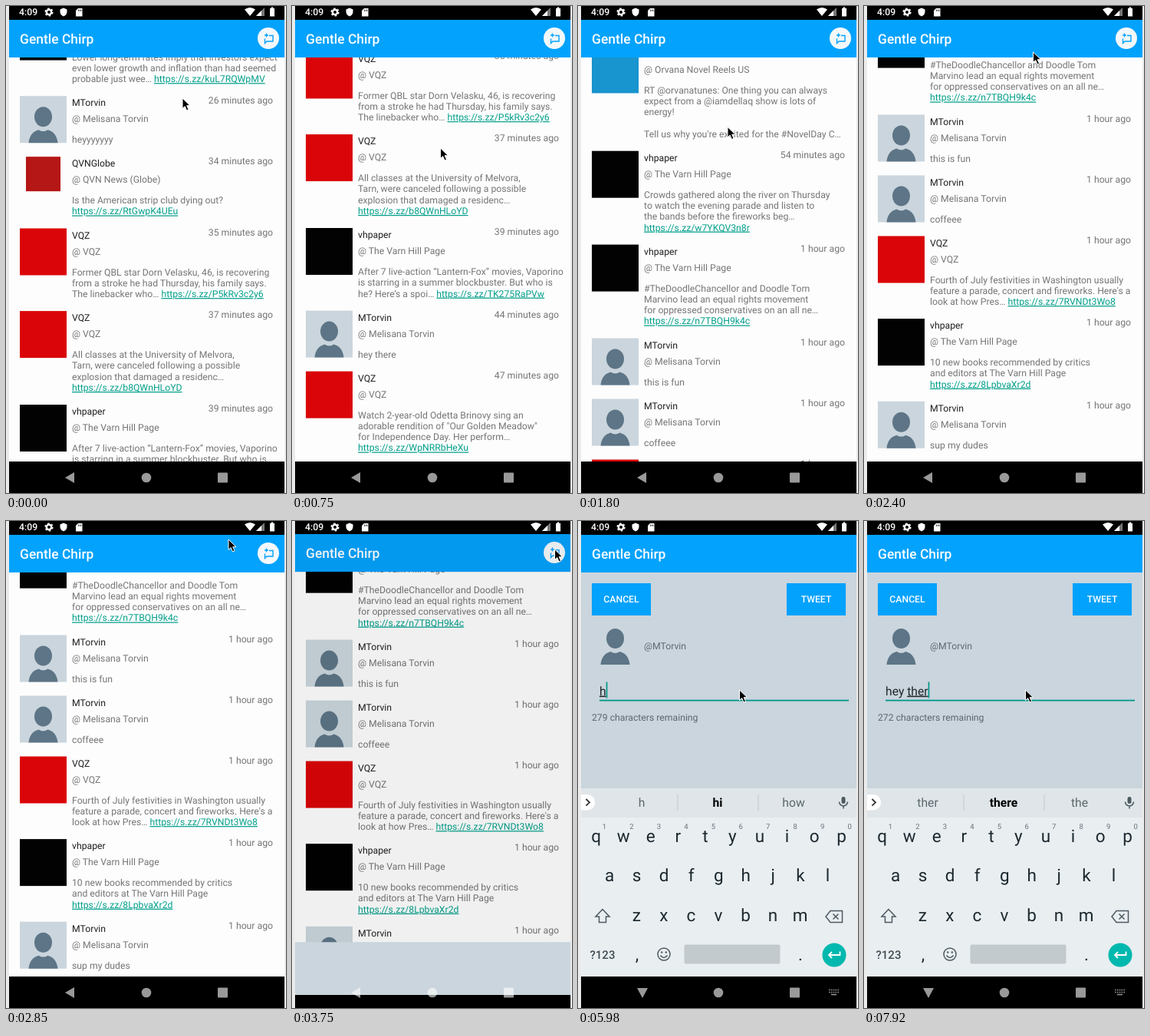
An HTML page that plays this animation: 365 by 634 pixels, repeating every 8000 ms.

```html
<!DOCTYPE html>
<html lang="en">
<head>
<meta charset="utf-8">
<title>Gentle Chirp</title>
<style>
  html, body { margin: 0; width: 100%; height: 100%; overflow: hidden; background: #ebebeb; }
  svg { display: block; width: 365px; height: 634px; }
  text { font-family: Roboto, "Open Sans", sans-serif; white-space: pre; text-rendering: geometricPrecision; }
  .link { fill: #009f8a; text-decoration: underline; }
  .line { fill: none; stroke: #4d5a61; stroke-width: 1.5; }
</style>
</head>
<body>
<svg id="stage" viewBox="0 0 365 634"></svg>
<script>
const LOOP = 8000, LINE = 14.3, BODY = 12.22, FIELD = 15.71;
const BLUE = '#03a2fc', SHEET = '#cad5dd', GREY = '#757575';

const rect = (x, y, w, h, fill, more = '') =>
  `<rect x="${x}" y="${y}" width="${w}" height="${h}" fill="${fill}" ${more}/>`;
const path = (d, more = '') => `<path d="${d}" ${more}/>`;
const circle = (x, y, r, fill, more = '') => `<circle cx="${x}" cy="${y}" r="${r}" fill="${fill}" ${more}/>`;
const text = (x, y, str, size = BODY, fill = GREY, more = '') =>
  `<text x="${x}" y="${y}" font-size="${size}" fill="${fill}" ${more}>${str}</text>`;
const MID = 'text-anchor="middle"', END = 'text-anchor="end"', MEDIUM = 'font-weight="500"';

const person = '<ellipse cx="30.5" cy="27" rx="11.5" ry="13" fill="#5d7586"/>' +
  path('M11.5 61c1-10 6-15 13-17c4 2.5 8 2.5 12 0c7 2 12 7 13 17z', 'fill="#5d7586"');
const block = color => rect(0, 0, 61, 61, color);

const accounts = {
  friend: ['MTorvin', 'Melisana Torvin', rect(0, 0, 61, 61, SHEET) + person],
  globe: ['QVNGlobe', 'QVN News (Globe)', rect(8, 0, 45, 45, '#b51616')],
  red: ['VQZ', 'VQZ', block('#da0508')],
  paper: ['vhpaper', 'The Varn Hill Page', block('#020202')],
  reels: ['NovelReels', 'Orvana Novel Reels US', block('#1894ce')]
};

// account, age, lines; a trailing web address becomes a link
const posts = [
  ['paper', '25 minutes', 'Lower long-term rates imply that investors expect|even lower growth and inflation than had seemed|probable just wee… https://s.zz/kuL7RQWpMV'],
  ['friend', '26 minutes', 'heyyyyyyy'],
  ['globe', '34 minutes', 'Is the American strip club dying out?|https://s.zz/RtGwpK4UEu'],
  ['red', '35 minutes', 'Former QBL star Dorn Velasku, 46, is recovering|from a stroke he had Thursday, his family says.|The linebacker who… https://s.zz/P5kRv3c2y6'],
  ['red', '37 minutes', 'All classes at the University of Melvora,|Tarn, were canceled following a possible|explosion that damaged a residenc…|https://s.zz/b8QWnHLoYD'],
  ['paper', '39 minutes', 'After 7 live-action “Lantern-Fox” movies, Vaporino|is starring in a summer blockbuster. But who is|he? Here’s a spoi… https://s.zz/TK275RaPVw'],
  ['friend', '44 minutes', 'hey there'],
  ['red', '47 minutes', 'Watch 2-year-old Odetta Brinovy sing an|adorable rendition of "Our Golden Meadow"|for Independence Day. Her perform…|https://s.zz/WpNRRbHeXu'],
  ['reels', '48 minutes', "RT @orvanatunes: One thing you can always|expect from a @iamdellaq show is lots of|energy!||Tell us why you're excited for the #NovelDay C…"],
  ['paper', '54 minutes', 'Crowds gathered along the river on Thursday|to watch the evening parade and listen to|the bands before the fireworks beg…|https://s.zz/w7YKQV3n8r'],
  ['paper', '1 hour', '#TheDoodleChancellor and Doodle Tom|Marvino lead an equal rights movement|for oppressed conservatives on an all ne…|https://s.zz/n7TBQH9k4c'],
  ['friend', '1 hour', 'this is fun'],
  ['friend', '1 hour', 'coffeee'],
  ['red', '1 hour', "Fourth of July festivities in Washington usually|feature a parade, concert and fireworks. Here's a|look at how Pres… https://s.zz/7RVNDt3Wo8"],
  ['paper', '1 hour', '10 new books recommended by critics|and editors at The Varn Hill Page|https://s.zz/8LpbvaXr2d'],
  ['friend', '1 hour', 'sup my dudes']
];

function drawPosts() {
  let y = 10;
  return posts.map(([key, age, body]) => {
    const [user, name, avatar] = accounts[key], lines = body.split('|');
    const out = `<g transform="translate(0 ${y})"><g transform="translate(18 0)">${avatar}</g>` +
      text(86, 13.3, user, BODY, '#1f1f1f') + text(86, 34, '@ ' + name) + text(348, 9.3, age + ' ago', BODY, GREY, END) +
      lines.map((s, i) => text(86, 61 + i * LINE, s.replace(/https:\S+/, '<tspan class="link">$&</tspan>'))).join('') + '</g>';
    y += 79 + (lines.length - 1) * LINE;
    return out;
  }).join('');
}

const header = rect(4, 18, 359, 49, BLUE) + text(18, 49, 'Gentle Chirp', 17.46, '#fff', MEDIUM);

const composeButton = circle(342, 42, 14, '#f4f8fb') +
  path('M343 38.5h5v7.5h-8l-2.5 2.5v-6M339.500 35.500v5M337 38h5', `fill="none" stroke="${BLUE}" stroke-width="1.4"`);

const statusIcons = text(17, 12.4, '4:09', BODY, '#fff', MEDIUM) +
  circle(56, 8, 3.2, 'none', 'stroke="#fff" stroke-width="2.4"') +
  circle(56, 8, 4.8, 'none', 'stroke="#fff" stroke-width="1.6" stroke-dasharray="2.5 2.53"') +
  path('M75 2.500l4.500 2v3.500q-.5 4-4.500 5.500q-4-1.500-4.500-5.500v-3.500z', 'fill="#fff"') +
  path('M94 3h5.500v10.500h-8.500v-7.500z', 'fill="#fff"') + path('M94.500 4.500v2.500M96.300 4.500v2.500M98 4.500v2.500', 'stroke="#000" stroke-width=".7"') +
  path('M311 4.500q7-5 14 0l-7 8.500z', 'fill="#fff"') +
  path('M337 2v11h-11z', 'fill="#777"') + path('M333 6v7h-7z', 'fill="#fff"') +
  path('M344 3h1.700v-1.500h2.600v1.500h1.700v10.500h-6z', 'fill="#fff"');

const navIcons = '<g fill="#fff" opacity=".6">' + path('M77 614l12-7v14z', 'id="back"') +
  circle(183, 614, 6.3) .replace('fill="undefined"', '') + '<rect x="276" y="607.500" width="13" height="13" rx="1"/>' +
  '<g id="imeIcon">' + path('M327 610.500h13M327 613.500h13', 'stroke="#fff" stroke-width="1.600" stroke-dasharray="1.600 1.250" fill="none"') +
  path('M330 616.500h7', 'stroke="#fff" stroke-width="1.500"') + '</g></g>';

const button = (x, label) => rect(x, 81, 77, 42, BLUE) + text(x + 38.5, 106.4, label, BODY, '#fff', MID + MEDIUM);

const composer = rect(4, 0, 359, 593, SHEET) + rect(4, 0, 359, 18, '#000') + header +
  button(18, 'CANCEL') + button(272, 'TWEET') +
  `<g transform="translate(18 126)">${person}</g>` +
  text(86, 167.4, '@MTorvin', BODY, '#5f696f') +
  text(28, 226.6, 'Enter tweet here...', FIELD, '#7d878e', 'id="hint"') +
  text(28, 226.6, '', FIELD, '#20272b', 'id="typed"') +
  rect(28, 232.7, 325, 1, '#6d7880', 'id="fieldLine"') +
  rect(28, 209.5, 1.7, 21, '#009688', 'id="caret"') +
  text(18, 260.4, '', BODY, '#5d666c', 'id="count"');

function drawKeyboard() {
  const ink = '#1c292f';
  const row = (keys, x0, y) => [...keys].map((k, i) => text(x0 + 35.55 * i, y, k, 22.5, ink, MID)).join('');
  const digits = [...'1234567890'].map((d, i) => text(34.3 + 35.55 * i, 400.5, d, 9.5, '#66737a', MID)).join('');
  const words = [83, 182, 281].map((x, i) =>
    text(x, 372, '', FIELD, i === 1 ? '#000' : '#5c686e', `class="word" ${MID} ${i === 1 ? 'font-weight="700"' : ''}`)).join('');
  return rect(4, 347, 359, 246, '#e9eef1') + rect(4, 347, 359, 39, '#dfe5e8') + rect(4, 346.5, 359, 1, '#c3ccd2') +
    path('M4 356h8a10 10 0 0 1 0 20.500h-8z', 'fill="#fff"') +
    path('M10.500 362l4.500 4.300l-4.500 4.300', 'class="line" style="stroke:#333;stroke-width:1.800"') +
    rect(129.5, 356, 1, 21, '#c2cacf') + rect(234.5, 356, 1, 21, '#c2cacf') + words +
    rect(343.5, 359, 5, 9, '#4d5a61', 'rx="2.5"') + path('M340.500 365.500a5.500 5.500 0 0 0 11 0M346 371v3.500', 'class="line"') +
    row('qwertyuiop', 23.7, 418) + digits + row('asdfghjkl', 41, 469) + row('zxcvbnm', 76.3, 521) +
    path('M32 505.500l-9 9.500h4.500v7.500h9v-7.500h4.500z', 'class="line"') +
    path('M329 507.500h15.500v15h-15.500l-6-7.500zM332.500 511.500l7 7M339.500 511.500l-7 7', 'class="line"') +
    text(32, 569.5, '?123', 15, '#3f4c53', MID + MEDIUM) + text(77, 572, ',', 22.5, ink, MID) + text(290, 572, '.', 22.5, ink, MID) +
    circle(112, 564, 8, 'none', 'class="line"') + path('M107.500 565.500q4.500 6 9 0', 'class="line"') +
    circle(109.2, 561.5, 1.2, '#4d5a61') + circle(114.8, 561.5, 1.2, '#4d5a61') +
    rect(138.5, 551.5, 125, 25, '#c3cacd', 'rx="2"') +
    circle(334, 565, 15.5, '#00b8ae') + path('M341.500 560.500v4.500h-14M331 561l-4 4l4 4', 'class="line" style="stroke:#fff;stroke-width:1.800"');
}

const pointer = path('M0 0v13.500l3.200-2.900l2.300 5.400l2.500-1.100l-2.300-5.200h4.300z', 'fill="#000" stroke="#fff" stroke-width="1"');

document.getElementById('stage').innerHTML = `
  <defs>
    <clipPath id="listClip">${rect(4, 67, 359, 526)}</clipPath>
    <clipPath id="sheetClip"><rect id="reveal" x="4" width="359"/></clipPath>
    <clipPath id="keysClip">${rect(4, 67, 359, 526)}</clipPath>
  </defs>
  ${rect(4, 0, 359, 634, '#000')}
  <g id="feed">${rect(4, 67, 359, 526, '#fdfdfd')}
    <g clip-path="url(#listClip)"><g id="list">${drawPosts()}</g></g>${header}${composeButton}</g>
  <g id="sheet" clip-path="url(#sheetClip)">${composer}</g>
  <g clip-path="url(#keysClip)"><g id="keyboard">${drawKeyboard()}</g></g>
  ${navIcons}${statusIcons}<g id="pointer">${pointer}</g>`;

// tables of [time, value, ...]
const scrollSteps = [[0, 0], [150, 68], [300, 120], [450, 170], [600, 206], [750, 230], [900, 245], [1050, 253], [1200, 260],
  [1350, 402.4], [1500, 556], [1650, 680], [1800, 775], [1950, 838], [2100, 870], [2250, 930], [2400, 1066], [2550, 1066], [3150, 1052]];
const pointerSteps = [[0, 230, 120], [150, 232, 50], [300, 235, 2], [600, 215, 60], [900, 172, 310], [1050, 172, 390], [1200, 175, 385],
  [1350, 176.5, 242.5], [1500, 180, 90], [1650, 185, 75], [1950, 205, 240], [2100, 212, 256], [2250, 217, 196], [2400, 220.5, 60],
  [2550, 226, 22], [2850, 290, 24], [3150, 350, 34], [3300, 342.5, 37], [3750, 342.5, 37], [4350, 214, 196], [4500, 208, 212], [4650, 210.5, 220]];
const sheetSteps = [[3600, 0], [3750, .077], [3900, .784], [4050, .99], [4200, 1]];
const keyboardSteps = [[4800, 250], [4950, 150], [5100, 25], [5240, 0]];
const typing = [[0, '', 'I', 'The', "I'm"], [5980, 'h', 'h', 'hi', 'how'], [6120, 'he', 'he', 'hey', 'the'],
  [6270, 'hey ', 'I', 'there', 'you'], [6570, 'hey t', 't', 'the', 'to'], [7620, 'hey th', 'th', 'the', 'that'],
  [7770, 'hey the', 'the', 'there', 'they'], [7920, 'hey ther', 'ther', 'there', 'the']];
const caretShown = [[4800, 5530], [5980, 7020], [7620, LOOP]];

function at(steps, t) {
  const i = steps.findIndex(s => s[0] > t);
  if (i === 0) return steps[0].slice(1);
  if (i < 0) return steps[steps.length - 1].slice(1);
  const a = steps[i - 1], b = steps[i], k = (t - a[0]) / (b[0] - a[0]);
  return a.slice(1).map((v, n) => v + (b[n + 1] - v) * k);
}

const $ = id => document.getElementById(id);
const set = (id, attrs) => { for (const k in attrs) $(id).setAttribute(k, attrs[k]); };
const move = (id, x, y) => set(id, { transform: `translate(${x} ${y})` });
const show = (id, on) => set(id, { visibility: on ? 'visible' : 'hidden' });
const words = document.querySelectorAll('.word');
let lastTyped = null;

function type([, value, ...guesses]) {
  if (value === lastTyped) return;
  lastTyped = value;
  $('typed').innerHTML = value.replace(/\S+$/, '<tspan text-decoration="underline">$&</tspan>');
  $('count').textContent = `${280 - value.length} characters remaining`;
  words.forEach((w, i) => w.textContent = guesses[i]);
  show('hint', !value);
  set('caret', { x: 28 + (value ? $('typed').getComputedTextLength() : 0) });
}

function render(t) {
  const tick = t < 5240 ? Math.floor(t / 150) * 150 : t;
  const [open] = at(sheetSteps, tick);
  move('list', 0, -.4 - at(scrollSteps, tick)[0]);
  move('feed', 0, -12 * open);
  set('feed', { opacity: tick < 3750 ? 1 : tick < 3900 ? .95 : .9 });
  move('sheet', 0, 26 * (1 - open));
  set('reveal', { y: 568 * (1 - open), height: 593 - 568 * (1 - open) });
  show('sheet', open > 0);

  const focused = tick >= 4800, keys = tick >= 4950;
  set('fieldLine', { height: focused ? 1.8 : 1, fill: focused ? '#009688' : '#6d7880' });
  move('keyboard', 0, at(keyboardSteps, tick)[0]);
  show('keyboard', keys);
  show('imeIcon', keys);
  set('back', { d: keys ? 'M77 608h14l-7 13z' : 'M77 614l12-7v14z' });

  type(typing.filter(s => s[0] <= t).pop());
  show('caret', open === 1 && caretShown.some(([a, b]) => t >= a && t < b));
  if (!focused) show('hint', open > 0);
  else show('hint', !lastTyped);
  move('pointer', ...at(pointerSteps, tick));
}

const start = performance.now();
function frame() {
  render((performance.now() - start) % LOOP);
  requestAnimationFrame(frame);
}
frame();
</script>
</body>
</html>
```
